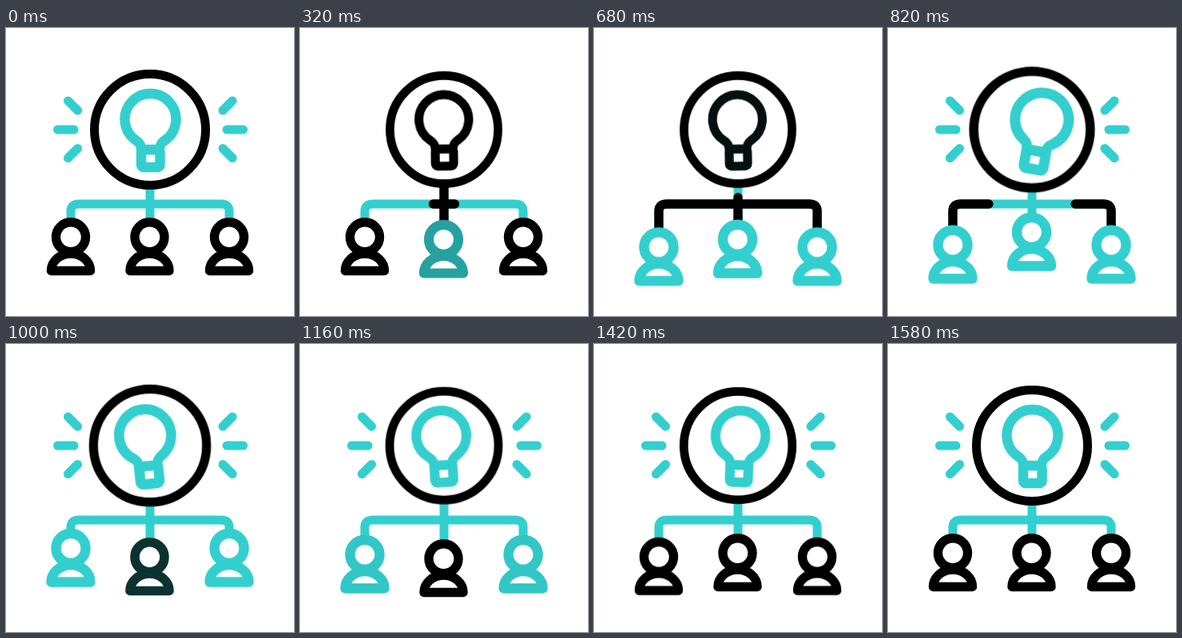
Write an HTML page that moves like this. It is 360 by 360 pixels and loops after 1.9 s.

```html
<!DOCTYPE html>
<html lang="en">
<head>
<meta charset="utf-8">
<title>Sharing an idea</title>
<style>
  html, body { margin: 0; width: 100%; height: 100%; overflow: hidden; background: #fff; }
  svg { display: block; width: 100vw; height: 100vh; --teal: #33cfcf; }
  svg * { animation: 1900ms ease-in-out infinite both; }
  .art { fill: none; stroke: #000; stroke-width: 11; stroke-linecap: round; stroke-linejoin: round; }
  .teal { stroke: var(--teal); }

  .trim { stroke-dasharray: 1 2; }
  .rays { animation-name: rays; }
  .stem { animation-name: stem; stroke-width: 11.4; }
  .arm { animation-name: arm; stroke-width: 11.4; }
  .pulse { animation-name: pulse; transform-origin: 180px 127px; }
  .swing { animation-name: swing; transform-origin: 180.5px 177px; }
  .glow { animation-name: glow; }
  .bob { animation-name: bob; }
  .tint { animation-name: tint; fill: #fff; }
  .late { animation-delay: 200ms; }
  .late .tint { animation-delay: 220ms; }

  @keyframes rays {
    0%, 6.32% { stroke-dashoffset: 0; }
    14%, 34.7% { stroke-dashoffset: 1.1; }
    42%, 100% { stroke-dashoffset: 0; }
  }
  @keyframes stem {
    0%, 7.9% { stroke-dashoffset: 1.1; }
    14.2%, 33.7% { stroke-dashoffset: 0; }
    40%, 100% { stroke-dashoffset: -1.1; }
  }
  @keyframes arm {
    0%, 13.8% { stroke-dashoffset: 1.1; }
    24.2%, 38.95% { stroke-dashoffset: 0; }
    48.95%, 100% { stroke-dashoffset: -1.1; }
  }
  @keyframes pulse {
    0%, 6.32% { transform: scale(1); animation-timing-function: ease-out; }
    29.5%, 34.2% { transform: scale(.956); }
    40% { transform: scale(1.05); }
    69.5% { transform: scale(.963); }
    83.16%, 100% { transform: scale(1); }
  }
  @keyframes swing {
    0%, 6.32% { transform: rotate(0deg); }
    34.2% { transform: rotate(-2.2deg); }
    42.3% { transform: rotate(10.5deg); }
    55.8% { transform: rotate(-8deg); }
    68.4% { transform: rotate(4deg); }
    83.16%, 100% { transform: rotate(0deg); }
  }
  @keyframes glow {
    0%, 6.32% { stroke: var(--teal); stroke-width: 12.4px; }
    12.1%, 34.7% { stroke: #000; stroke-width: 11.4px; }
    40.5%, 100% { stroke: var(--teal); stroke-width: 12.4px; }
  }
  @keyframes bob {
    0%, 11.3% { transform: translateY(0); }
    28.42% { transform: translateY(13.5px); }
    42.63% { transform: translateY(-6px); }
    57.37% { transform: translateY(8px); }
    72.63%, 100% { transform: translateY(0); }
  }
  @keyframes tint {
    0%, 12.63% { stroke: #000; stroke-width: 11.4px; }
    19%, 48.7% { stroke: var(--teal); stroke-width: 12.4px; }
    54.7%, 100% { stroke: #000; stroke-width: 11.4px; }
  }
</style>
</head>
<body>
<svg viewBox="0 0 360 360">
  <defs>
    <g id="person">
      <path d="M-24.5 303.5A24.5 21.500 0 0 1 24.5 303.5Z"/>
      <circle cy="261.3" r="18.5"/>
    </g>
    <path id="stem" d="M180 195V258" pathLength="1"/>
    <path id="left" d="M180 220H91Q81 220 81 229V256" pathLength="1"/>
    <path id="right" d="M180 220H269Q279 220 279 229V256" pathLength="1"/>
  </defs>

  <g class="art">
    <g class="teal">
      <use href="#stem"/>
      <use href="#left"/>
      <use href="#right"/>
    </g>
    <g class="trim stem"><use href="#stem"/></g>
    <g class="trim arm">
      <use href="#left"/>
      <use href="#right"/>
    </g>

    <g class="teal trim rays">
      <path d="M89.5 103L77.5 91" pathLength="1"/>
      <path d="M85 127H64.5" pathLength="1"/>
      <path d="M89.5 150.5L77.5 162.5" pathLength="1"/>
      <path d="M271 103L283 91" pathLength="1"/>
      <path d="M276 127H296.5" pathLength="1"/>
      <path d="M271 150.5L283 162.5" pathLength="1"/>
    </g>

    <g class="pulse">
      <circle cx="180" cy="127" r="69.5" fill="#fff"/>
      <g class="swing">
        <g class="glow">
          <path d="M169 152C169 146 167 143.5 162.5 140.5A32 32 0 1 1 198.5 140.5C194 143.5 192 146 192 152"/>
          <rect x="169" y="152" width="23.5" height="22" rx="3"/>
        </g>
      </g>
    </g>

    <g class="bob"><use class="tint" href="#person" x="179.5"/></g>
    <g class="bob late">
      <use class="tint" href="#person" x="81"/>
      <use class="tint" href="#person" x="279"/>
    </g>
  </g>
</svg>
</body>
</html>
```
